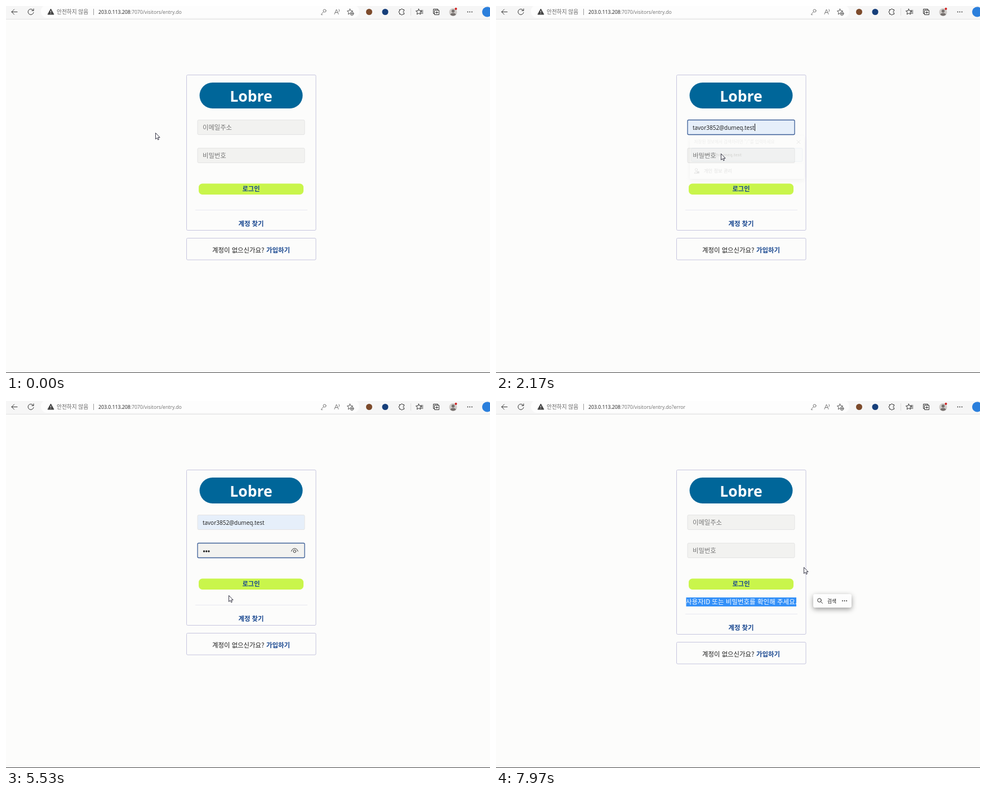
These frames come from a looping animation (859x652 px, 8000 ms). An HTML page:

```html
<!DOCTYPE html>
<html lang="ko">
<head>
<meta charset="utf-8">
<style>
html, body { margin: 0; width: 859px; height: 652px; overflow: hidden; background: #fcfcfb; }
svg { display: block; }
text { font: 11.4px "Noto Sans CJK KR", "Noto Sans CJK", sans-serif; fill: #1c1c1c; }
.mid { text-anchor: middle; }
.link { font-weight: 700; fill: #17468f; }
.hint { fill: #777; font-size: 11.3px; }
.lat { font-family: "Open Sans", sans-serif; }
.icon { fill: none; stroke: #333; stroke-width: 1; stroke-linecap: round; stroke-linejoin: round; }
.frame { fill: none; stroke: #c6c5de; }
.shadow { filter: drop-shadow(0 3px 5px #0006); }
.field { fill: #f2f2f0; stroke: #e4e4e4; }
.field.filled { fill: #e6effa; }
.field.focus { stroke: #3d5f98; stroke-width: 1.3; }
</style>
</head>
<body>
<svg width="859" height="652" viewBox="0 0 859 652">
  <defs>
    <clipPath id="selClip"><rect id="selBox" x="337.5" y="349" width="0" height="16"/></clipPath>
  </defs>

  <!-- browser bar -->
  <rect width="859" height="23" fill="#f6f6f6"/>
  <rect x="62" y="-2" width="565" height="23" rx="11" fill="#fdfdfd"/>
  <path d="M0 23.5H859" stroke="#e2e2e2"/>
  <path class="icon" d="M20 10.5H10M14.500 6L10 10.500L14.500 15" stroke-width="1.2"/>
  <path id="reload" class="icon" d="M48.500 8A5 5 0 1 0 49 11.500M49 5V8.300H45.700" stroke-width="1.2"/>
  <path id="stop" class="icon" d="M40 6.500L48 14.500M48 6.500L40 14.500" stroke-width="1.2"/>
  <path d="M79.500 5L85 15H74Z" fill="#444" stroke="#444" stroke-linejoin="round"/>
  <path d="M79.500 8.500V11.500M79.500 13V14" stroke="#fff"/>
  <text x="90" y="14" style="font-size:9.7px;fill:#666">안전하지 않음</text>
  <path d="M155.500 5V16" stroke="#999"/>
  <text class="lat" x="164" y="14" style="font-size:8.7px">203.0.113.208<tspan id="path" fill="#707070"></tspan></text>
  <g class="icon" style="stroke:#777">
    <circle cx="565.500" cy="8.500" r="2.500"/><path d="M563.500 10.500L559.500 14.500V15.500H561.500"/>
    <path d="M583 14.500L586.500 6L590 14.500M584.200 11.500H588.800M591 6Q592.500 8 591 10"/>
  </g>
  <g class="icon" style="stroke:#555">
    <path class="star" transform="translate(610.500 10.500)"/>
    <circle cx="614" cy="13.500" r="3" fill="#fdfdfd"/><path d="M612.500 13.500H615.500M614 12V15"/>
  </g>
  <circle cx="644.500" cy="10.500" r="5.500" fill="#7c4a2b"/>
  <circle cx="673" cy="10.500" r="5.500" fill="#173f7a"/>
  <path class="icon" d="M698.500 6.500H701A1.500 1.500 0 0 1 704 6.500H706.500V9A1.500 1.500 0 0 0 706.500 12V14.500H704A1.500 1.500 0 0 1 701 14.500H698.500V12A1.500 1.500 0 0 1 698.500 9Z"/>
  <path d="M718.500 4V17" stroke="#ddd"/>
  <path class="icon star" transform="translate(732.500 10.500)"/>
  <path class="icon" d="M736 8H740M736 10.500H740M736 13H740"/>
  <path class="icon" d="M760 13.500H758.500V5.500H766.500V7M761 7.500H768.500V15.500H761ZM764.700 9.500V13.500M762.700 11.500H766.700"/>
  <circle cx="793.500" cy="11" r="7" fill="#cfcbc8"/>
  <circle cx="793.500" cy="9" r="2.700" fill="#77716f"/>
  <path d="M788.500 15.500Q789 12.500 793.500 12.500T798.500 15.500Q793.500 19.500 788.500 15.500" fill="#77716f"/>
  <circle cx="798.500" cy="5" r="2" fill="#d02020"/>
  <path d="M819.500 10.500H828" stroke="#333" stroke-width="1.800" stroke-linecap="round" stroke-dasharray="0 3.700"/>
  <circle cx="854" cy="10.500" r="9" fill="#2b7fdc"/>
  <path d="M0 651.500H859" stroke="#444"/>

  <!-- login card -->
  <rect id="card" class="frame" x="320.500" y="122.500" width="229.500" height="276" rx="2"/>
  <rect x="343.500" y="136" width="183" height="46" rx="23" fill="#069"/>
  <text class="lat mid" x="435" y="169.500" style="font-size:26.500px;font-weight:700;fill:#fff">Lobre</text>
  <rect id="mailField" x="340" y="202.500" width="190" height="26" rx="2"/>
  <text id="mailHint" class="hint" x="349" y="220">이메일주소</text>
  <text id="mailGhost" class="user" x="349" y="220" style="font:8.750px 'Liberation Sans',sans-serif"></text>
  <text id="mail" class="lat user" x="349" y="220" style="font-size:10px"></text>
  <rect id="passField" x="340" y="252.500" width="190" height="26" rx="2"/>
  <text id="passHint" class="hint" x="349" y="270">비밀번호</text>
  <g id="dots" fill="#222">
    <circle cx="351.500" cy="267" r="1.700"/><circle cx="355.700" cy="267" r="1.700"/><circle cx="359.900" cy="267" r="1.700"/>
  </g>
  <g id="eye" class="icon" stroke-width="1.200">
    <path d="M506.500 267Q508 262 512.300 262T518.100 267"/><circle cx="512.300" cy="267" r="2.300"/>
  </g>
  <path id="caret" stroke="#111"/>
  <rect x="342" y="315.500" width="186" height="19.500" rx="6.500" fill="#c9f54b"/>
  <text class="mid link" x="435" y="329" style="font-size:11.200px">로그인</text>
  <g id="error">
    <text class="mid msg" x="435.500" y="361"></text>
    <g clip-path="url(#selClip)">
      <rect x="337" y="349" width="200" height="16" fill="#3390f8"/>
      <text class="mid msg" x="435.500" y="361" style="fill:#fff"></text>
    </g>
  </g>
  <g id="below">
    <path d="M336 362.500H535" stroke="#e8e8f0"/>
    <text class="mid link" x="435" y="391">계정 찾기</text>
    <rect class="frame" x="320.500" y="412.500" width="229.500" height="38.500" rx="2"/>
    <text x="366" y="438">계정이 없으신가요?</text>
    <text class="link" x="462" y="438">가입하기</text>
  </g>

  <!-- saved address list -->
  <g id="popup">
    <rect class="shadow" x="340" y="229" width="211" height="79.500" rx="2" fill="#fdfdfd"/>
    <text x="348" y="243" style="font-size:7.800px;fill:#777">저장된 정보에서 검색하려면 "/"를 입력하세요</text>
    <path class="icon" d="M537.500 237.500L543.500 243.500M543.500 237.500L537.500 243.500"/>
    <rect id="row" x="343" y="252" width="204.500" height="24.500" rx="2" fill="#e3eefa" stroke="#88a8d0"/>
    <text class="lat user" x="348.500" y="267" style="font-size:7.500px;font-weight:700"></text>
    <path d="M340 279.500H551" stroke="#e2e2e2"/>
    <g class="icon"><circle cx="352" cy="291.500" r="2.200"/><path d="M353 298.500H348.500Q348.500 295.500 352 295.500"/></g>
    <rect x="353" y="294.500" width="4.500" height="4" fill="#222"/>
    <text x="366" y="297" style="font-size:8.600px">개인 정보 관리</text>
  </g>

  <!-- selection menu -->
  <g id="menu">
    <rect class="shadow" x="563" y="343" width="68" height="24" rx="3" fill="#fdfdfd"/>
    <g class="icon"><circle cx="574" cy="354" r="3.300"/><path d="M576.500 356.500L579.500 359.500"/></g>
    <text x="588" y="358.500" style="font-size:8.800px">검색</text>
    <path d="M615 355H623" stroke="#222" stroke-width="1.800" stroke-linecap="round" stroke-dasharray="0 3.600"/>
  </g>

  <path id="arrow" d="M0 0V11L2.500 8.700L4.200 12.300L5.900 11.500L4.300 8H7.600Z" fill="#fff" stroke="#223" stroke-width=".9"/>
  <path id="beam" d="M-2.500 -5.500H-.8Q0 -5.500 0 -4.500Q0 -5.500 .8 -5.500H2.500M0 -4.500V4.500M-2.500 5.500H-.8Q0 5.500 0 4.500Q0 5.500 .8 5.500H2.500" fill="none" stroke="#222"/>
</svg>
<script>
const LOOP = 8000;
const $ = id => document.getElementById(id);
const all = (sel, fn) => document.querySelectorAll(sel).forEach(fn);
const show = (id, on) => $(id).style.display = on ? "" : "none";
const ramp = (t, a, b) => Math.min(1, Math.max(0, (t - a) / (b - a)));
const ease = p => p * p * (3 - 2 * p);
const within = ([x, y], l, t, r, b) => x >= l && x <= r && y >= t && y <= b;

// pointer stops: time, x, y
const stops = [
  [30, 265, 225], [800, 385, 217], [1350, 385, 217], [1700, 398, 261], [1870, 399, 262],
  [2200, 399, 262], [2330, 383, 270], [3670, 383, 270], [3730, 384, 271], [4800, 384, 271],
  [4900, 157, 443], [5170, 157, 443], [5530, 395, 345], [5800, 402, 327], [6000, 402, 327],
  [6330, 351, 355], [6600, 351, 355], [6630, 353, 356], [6770, 353, 356], [7030, 336, 361],
  [7100, 338, 358], [7600, 507, 355], [7720, 546, 345], [7780, 546, 345], [7950, 546, 295]
];

function pointer(t) {
  const i = stops.findIndex(s => s[0] > t);
  if (i === 0) return stops[0].slice(1);
  if (i < 0) return stops.at(-1).slice(1);
  const [a, b] = [stops[i - 1], stops[i]];
  const p = ease(ramp(t, a[0], b[0]));
  return [1, 2].map(k => a[k] + (b[k] - a[k]) * p);
}

function setField(id, filled, focus) {
  $(id).setAttribute("class", "field" + (filled ? " filled" : "") + (focus ? " focus" : ""));
}

function draw(t) {
  const pos = pointer(t);
  const failed = t >= 6200;
  const loading = t >= 5900 && !failed;
  const mailFocus = t >= 1070 && t < 2500;
  const passFocus = t >= 2500 && t < 5900;
  const popupOn = t >= 1070 && t < 2300;
  const hover = popupOn && t < 1900 && within(pos, 343, 252, 547, 276);
  const filled = t >= 1900 && !failed;
  const typed = failed ? 0 : [3300, 3500, 3700].filter(k => t >= k).length;

  show("reload", !loading);
  show("stop", loading);
  $("path").textContent = ":7070/visitors/entry.do" + (t >= 6100 ? "?error" : "");

  setField("mailField", filled || hover, mailFocus);
  setField("passField", false, passFocus);
  show("mailHint", !filled && !hover);
  show("mailGhost", hover);
  show("mail", filled);
  show("passHint", !typed);
  show("eye", typed > 0);
  [...$("dots").children].forEach((dot, i) => dot.style.display = i < typed ? "" : "none");

  const blinkOff = (t >= 3030 && t < 3300) || (t >= 4300 && t < 4800) || (t >= 5300 && t < 5800);
  show("caret", (mailFocus && !hover) || (passFocus && !blinkOff));
  const caretX = mailFocus ? (filled ? 459.5 : 349.5) : 349.5 + typed * 4.3;
  $("caret").setAttribute("d", `M${caretX} ${mailFocus ? 209 : 259}v13`);

  // popup fades in, then shrinks slightly while fading out
  const out = ramp(t, 1900, 2300);
  const scale = 1 - 0.055 * out;
  show("popup", popupOn);
  $("popup").setAttribute("opacity", ramp(t, 1070, 1250) * (1 - out) ** 2);
  $("popup").setAttribute("transform", `translate(445 270) scale(${scale}) translate(-445 -270)`);
  show("row", hover || t >= 1900);

  show("error", failed);
  $("card").setAttribute("height", failed ? 292 : 276);
  $("below").setAttribute("transform", `translate(0 ${failed ? 16 : 0})`);
  $("selBox").setAttribute("width", t < 7100 ? 0 : Math.min(195.5, Math.max(0, pos[0] - 337.5)));
  $("menu").setAttribute("opacity", ramp(t, 7760, 7930));

  const overText = within(pos, 340, 202, 530, 228) ||
    (!popupOn && within(pos, 340, 252, 530, 278)) ||
    (failed && within(pos, 337, 348, 533, 365));
  show("arrow", !overText);
  show("beam", overText);
  const at = `translate(${Math.round(pos[0]) + 0.5} ${Math.round(pos[1]) + 0.5})`;
  $("arrow").setAttribute("transform", at);
  $("beam").setAttribute("transform", at);
}

const starPath = "M" + Array.from({ length: 10 }, (_, i) => {
  const r = i % 2 ? 2.5 : 5.3, a = i * Math.PI / 5;
  return `${(r * Math.sin(a)).toFixed(2)} ${(-r * Math.cos(a)).toFixed(2)}`;
}).join("L") + "Z";
all(".star", e => e.setAttribute("d", starPath));
all(".user", e => e.textContent = "tavor3852@dumeq.test");
all(".msg", e => {
  e.textContent = "사용자ID 또는 비밀번호를 확인해 주세요.";
  e.style.letterSpacing = ".1px";
});

const start = performance.now();
function tick() {
  draw((performance.now() - start) % LOOP);
  requestAnimationFrame(tick);
}
tick();
</script>
</body>
</html>
```
